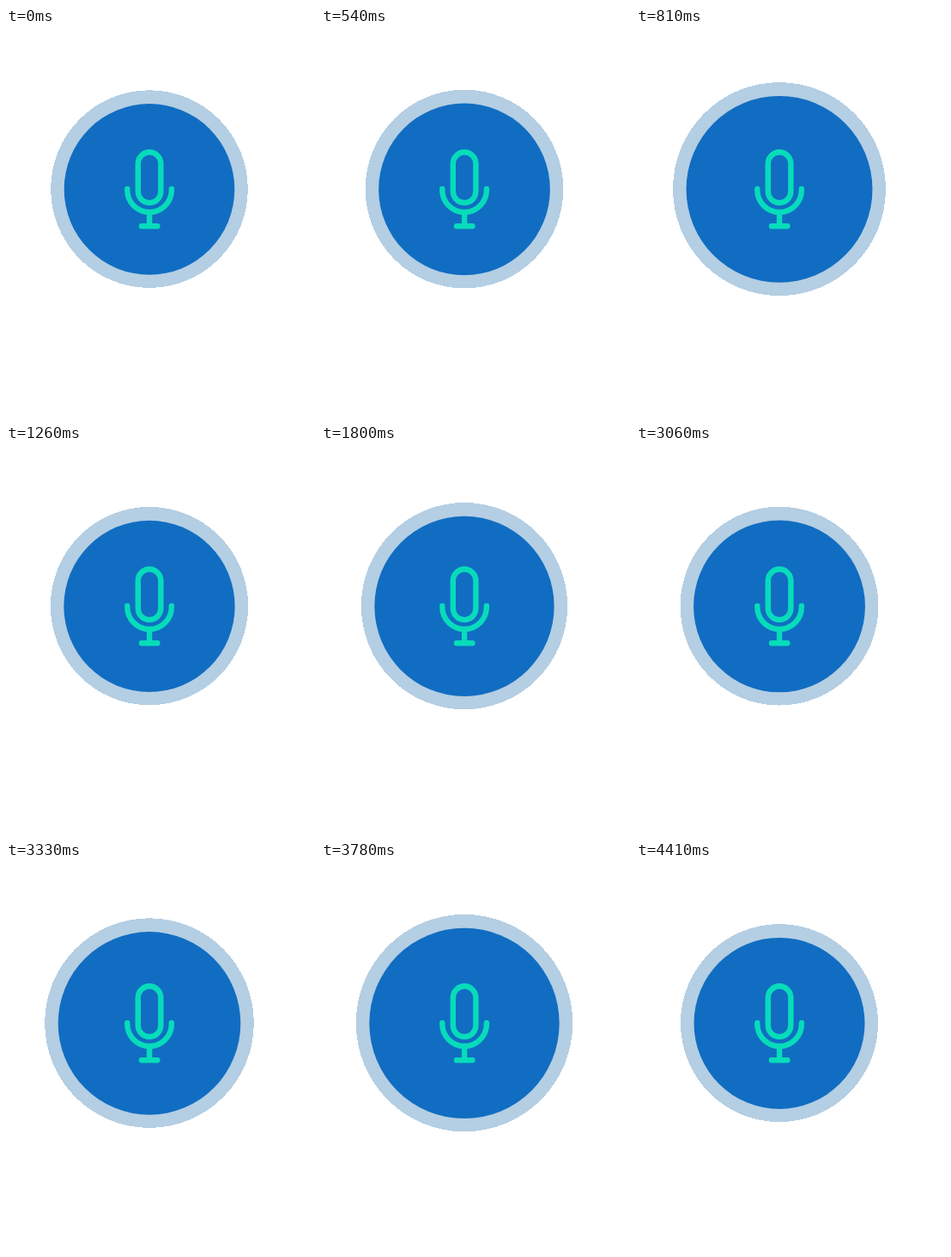
These frames come from a looping animation (360 px wide and 452 px high, 4.5 s). An HTML page:

```html
<!DOCTYPE html>
<html lang="en">
<head>
<meta charset="utf-8">
<title>Voice button</title>
<style>
  html, body { margin: 0; width: 100%; height: 100%; overflow: hidden; background: #fff; }
  svg { display: block; width: 100%; height: 100%; }
</style>
</head>
<body>
<svg viewBox="0 0 360 452">
  <circle id="halo" cx="167" cy="187.1" fill="#b4cee3" shape-rendering="crispEdges"/>
  <circle id="disc" cx="167" cy="187.4" fill="#116dc2"/>
  <g fill="none" stroke="#07dcba" stroke-width="6.4" stroke-linecap="round">
    <rect x="153.8" y="144.3" width="26.6" height="58.8" rx="13.3"/>
    <path d="M141.3 187v1.2a25.8 25.8 0 0 0 51.6 0v-1.2M167.1 214v16M158 230.3h18.4"/>
  </g>
</svg>
<script>
  const LOOP = 4500, STEP = 90;
  const REST = 114.8, RIM = 15.5, SPREAD = 205;
  const halo = document.getElementById('halo');
  const disc = document.getElementById('disc');

  // Spoken beats: step of the peak and how far it swells the button
  const beats = [
    [8, 15.4], [12, 9.2], [19, 9], [27, 12.9],
    [32, 17.8], [37, 7], [42, 11.4], [47, 5.6]
  ];

  // Smooth bump, 1 at the centre and 0 beyond the spread
  function bump(dt) {
    const x = Math.min(1, Math.abs(dt) / SPREAD);
    return Math.cos(x * Math.PI / 2) ** 2;
  }

  function draw(t) {
    const held = Math.floor(t / STEP) * STEP;
    const r = beats.reduce((sum, [peak, swell]) => sum + swell * bump(held - peak * STEP), REST);
    halo.setAttribute('r', r);
    disc.setAttribute('r', r - RIM);
  }

  const start = performance.now();
  function tick() {
    draw((performance.now() - start) % LOOP);
    requestAnimationFrame(tick);
  }
  tick();
</script>
</body>
</html>
```
